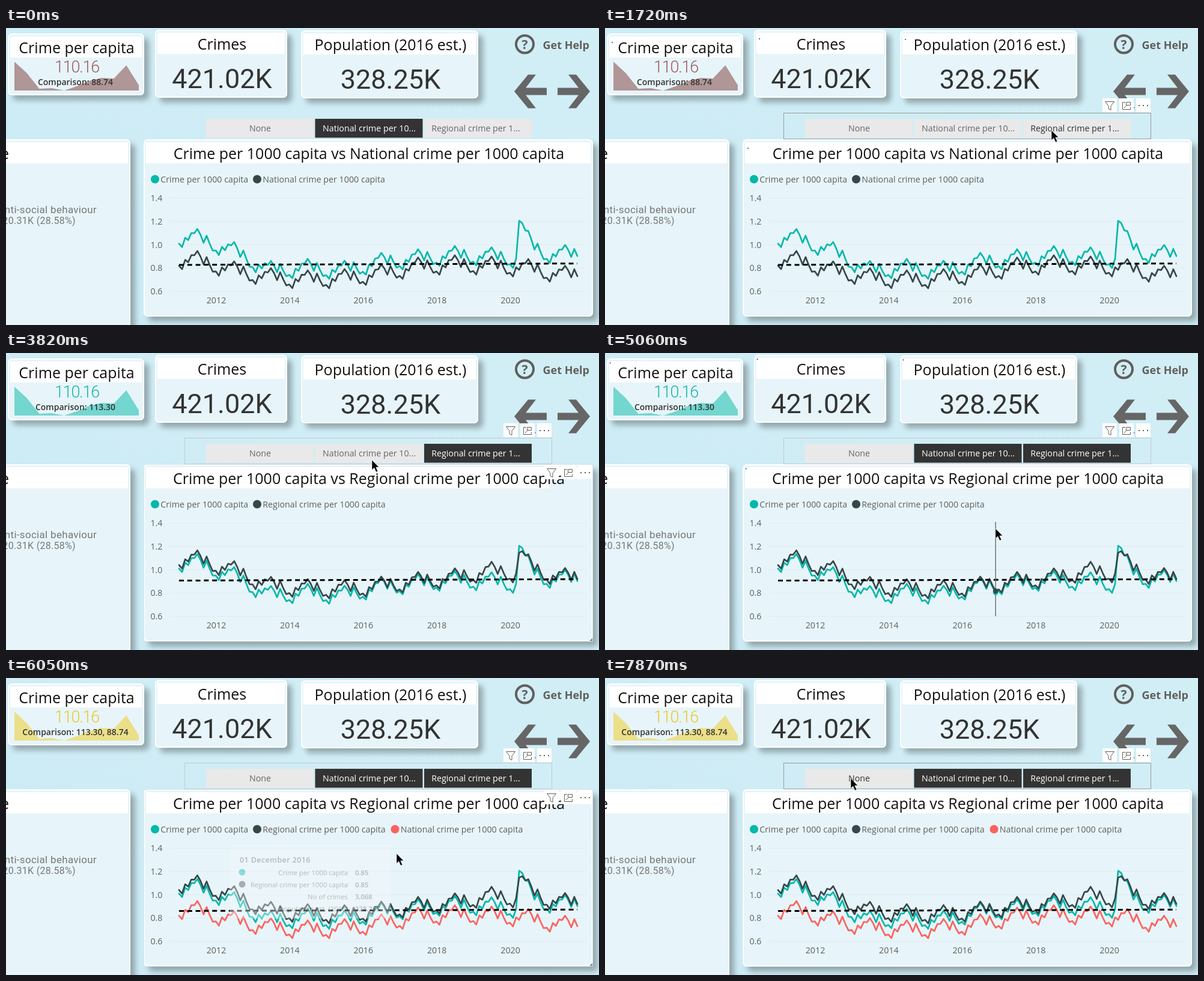
An HTML page for the animation above (8 s loop, 987 by 494 pixels).

```html
<!DOCTYPE html>
<html lang="en">
<head>
<meta charset="utf-8">
<title>Crime dashboard</title>
<style>
  html, body { margin: 0; width: 100%; height: 100%; overflow: hidden; background: #cfecf5; }
  svg { display: block; width: 987px; height: 494px; font: 14.25px "Open Sans", "Noto Sans", sans-serif; fill: #605e5c; }
  .title { font-size: 25px; fill: #111; text-anchor: middle; }
  .mid { text-anchor: middle; }
  .end { text-anchor: end; }
  .din { font-family: Roboto, "Liberation Sans", sans-serif; }
  .big { font-size: 45px; fill: #333; text-anchor: middle; }
  .line { fill: none; stroke-width: 2.7; stroke-linejoin: round; stroke-linecap: round; }
  .icon { fill: none; stroke: #605e5c; stroke-width: 1; }
</style>
</head>
<body>
<svg viewBox="0 0 987 494" xmlns="http://www.w3.org/2000/svg">
  <defs>
    <linearGradient id="bg" x1="0" y1="1" x2="1" y2="0">
      <stop offset="0" stop-color="#cbeaf4"/><stop offset=".6" stop-color="#d0edf6"/><stop offset="1" stop-color="#d2eef5"/>
    </linearGradient>
    <filter id="shadow" x="-10%" y="-15%" width="125%" height="145%">
      <feDropShadow dx="8" dy="8" stdDeviation="5" flood-color="#000" flood-opacity=".29"/>
    </filter>
    <g id="tools">
      <path fill="#fff" d="M828 117h24v23h-24zM856 117h24v23h-24zM884 117h24v23h-24z"/>
      <path class="icon" d="M832.5 122.500h15l-5.500 7v7l-4-2v-5z"/>
      <path class="icon" d="M866 123.500h-4.500v12h13v-4M867.500 123.500h7v5h-7zM864 133l4-4"/>
      <path fill="#605e5c" d="M888 128h2v2h-2zM895 128h2v2h-2zM902 128h2v2h-2z"/>
    </g>
    <path id="arrow" d="M846 105.500L869 77.500H882L865 99.500H900V111.500H865L882 133.500H869Z"/>
  </defs>

  <rect width="987" height="494" fill="url(#bg)"/>
  <g id="cards"></g>

  <path id="spark"/>
  <text id="perCapita" class="din mid" x="118" y="74" font-size="27" font-weight="300" letter-spacing="-1.2">110.16</text>
  <text id="comparison" class="mid" x="115.500" y="95" font-size="14" font-weight="600" fill="#333"></text>
  <text class="title" x="117.500" y="42">Crime per capita</text>
  <text class="title" x="359.500" y="36">Crimes</text>
  <text class="title" x="640" y="37">Population (2016 est.)</text>
  <text class="din big" x="359.500" y="99.500">421.02K</text>
  <text class="din big" x="640" y="100.500">328.25K</text>

  <circle cx="863.500" cy="27" r="14.500" fill="none" stroke="#605e5c" stroke-width="4"/>
  <text class="mid" x="863.500" y="34.500" font-size="21" font-weight="700">?</text>
  <text x="893.500" y="35" font-size="18" font-weight="700">Get Help</text>
  <g fill="#666"><use href="#arrow"/><use href="#arrow" transform="translate(1818) scale(-1 1)"/></g>

  <text class="title" style="text-anchor:end" x="5" y="218">Crime type</text>
  <g class="din end" fill="#777" letter-spacing=".3">
    <text x="151" y="308" font-size="17">Anti-social behaviour</text>
    <text x="116" y="326" font-size="16">120.31K (28.58%)</text>
  </g>

  <g id="buttons"></g>
  <g id="slicerHead"><rect id="slicerEdge" x="297.500" y="141.500" width="611" height="43" fill="none"/><use href="#tools"/></g>

  <rect id="titleCut" x="904" y="209" width="70" height="16" fill="#e7f5fa"/>
  <text id="chartTitle" class="title" x="604" y="218"></text>
  <g id="axes"></g>
  <g id="legend"></g>
  <g id="plot"></g>
  <path id="trend" fill="none" stroke="#000" stroke-width="3" stroke-dasharray="8 5.800"/>
  <g id="cross"></g>
  <g id="chartHead">
    <rect x="229.500" y="185.500" width="747" height="294" fill="none" stroke="#dfe6e8"/>
    <use href="#tools" x="68" y="70"/>
    <path d="M976 474v5h-5z" fill="#888"/>
  </g>
  <g id="spinners" fill="#444"></g>

  <g id="dataTip" font-size="11.300">
    <rect x="372" y="278" width="268" height="122" fill="#f4fafc"/>
    <text x="389" y="307" font-size="12.500" font-weight="600" letter-spacing=".4">01 December 2016</text>
    <circle cx="393" cy="323" r="5.500" fill="#01b8aa"/><circle cx="393" cy="343" r="5.500" fill="#374649"/>
    <g id="tipRows"></g>
  </g>
  <g id="nameTip">
    <rect x="754.500" y="185.500" width="179" height="24" fill="#fff" stroke="#888"/>
    <text x="759" y="202" font-size="11.900">Regional crime per 1000 capita</text>
  </g>
  <path id="cursor" d="M0 0V16.500L3.800 13L7 20L9.800 18.700L6.800 12H11.800Z" fill="#000" stroke="#fff" stroke-width=".6"/>
</svg>
<script>
const $ = id => document.getElementById(id);
const LOOP = 8000, MONTHS = 131, LOCKDOWN = 111;
const TEAL = '#01b8aa', DARK = '#374649', RED = '#fd625e';
const show = (id, on) => $(id).setAttribute('visibility', on ? 'visible' : 'hidden');
const ramp = (t, a, b) => Math.max(0, Math.min(1, (t - a) / (b - a)));
const smooth = p => p * p * (3 - 2 * p);
const mix = (a, b, p) => a + (b - a) * p;

// Monthly rate = yearly level + shared seasonal swing + lockdown surge that decays.
const season = [-5, -8, 0, -2, 4, 4, 8, 4, -2, 5, -1, -6];
function rates(levels, surge) {
  return Array.from({ length: MONTHS }, (_, m) => {
    const year = ramp(m, 5.5, 125.5) * 10, i = Math.min(9, Math.floor(year));
    const bump = m < LOCKDOWN ? 0 : surge * Math.exp((LOCKDOWN - m) / 4);
    return mix(levels[i], levels[i + 1], year - i) + season[m % 12] + bump;
  });
}
const local = { name: 'Crime', data: rates([106, 95, 78, 80, 78, 85, 88, 91, 90, 87, 91], 35) };
const national = { name: 'National crime', data: rates([87, 78, 72, 70, 71, 75, 81, 83, 82, 80, 74], 0) };
const regional = { name: 'Regional crime', data: rates([109, 100, 86, 84, 83, 86, 90, 93, 99, 96, 93], 20) };
const monthX = m => 288 + m * 5.1;
const rateY = v => 438 - (v - 60) * 1.9375;

const modes = [
  { series: [local, national], colors: [TEAL, DARK], trend: 394, compare: '88.74', area: '#b09696', ink: '#a05a5a' },
  { series: [local, regional], colors: [TEAL, DARK], trend: 378.5, compare: '113.30', area: '#73d6cf', ink: '#15b5aa' },
  { series: [local, regional, national], colors: [TEAL, DARK, RED], trend: 387.5, compare: '113.30, 88.74', area: '#ecdf89', ink: '#efc62c' }];

const cards = [[3, 9, 227, 103], [248, 3, 220, 113], [491, 4, 295, 113], [229, 185, 748, 295], [-60, 185, 267, 340]];
$('cards').innerHTML = cards.map(([x, y, w, h]) =>
  `<rect x="${x + 1}" y="${y + 1}" width="${w - 2}" height="${h - 2}" rx="6" fill="#e7f5fa" stroke="#fff" stroke-width="2" filter="url(#shadow)"/>
   <rect x="${x + 4}" y="${y + 5}" width="${w - 8}" height="35" fill="#fff"/>`).join('');

const sparkY = [56, 75, 101, 100, 104, 97, 88, 83, 84, 62, 95];
$('spark').setAttribute('d', 'M14 104' + sparkY.map((y, i) => `L${14 + i * 20.7} ${y}`).join('') + 'V104Z');

$('axes').innerHTML = [60, 80, 100, 120, 140].map(v =>
  `<path d="M273 ${rateY(v)}H965" stroke="#dfe9ec"/><text class="end" x="260.500" y="${rateY(v) + 5}">${(v / 100).toFixed(1)}</text>`).join('') +
  [2012, 2014, 2016, 2018, 2020].map((year, i) => `<text class="mid" x="${350 + i * 122.4}" y="458">${year}</text>`).join('');

const labels = ['None', 'National crime per 10...', 'Regional crime per 1...'];
const buttonX = i => 333 + i * 181.5;
$('buttons').innerHTML = labels.map((s, i) =>
  `<rect x="${buttonX(i)}" y="151" width="179" height="31.500"/><text class="mid" x="${buttonX(i) + (i == 2 ? 86 : 90)}" y="172">${s}</text>`).join('');
const boxes = [...$('buttons').querySelectorAll('rect')];
const captions = [...$('buttons').querySelectorAll('text')];

$('tipRows').innerHTML = [['Crime per 1000 capita', '0.85'], ['Regional crime per 1000 capita', '0.85'],
  ['No of crimes', '3,068'], ['Population est. (2016)', '328.25K']].map(([k, v], i) =>
  `<text class="end" x="569" y="${327.5 + i * 20}">${k}</text><text x="581" y="${327.5 + i * 20}" font-weight="600">${v}</text>`).join('');

let mode;
function drawMode(next) {
  if (next === mode) return;
  mode = next;
  const { series, colors, trend, compare, area, ink } = mode;
  $('chartTitle').textContent = `Crime per 1000 capita vs ${series[1].name} per 1000 capita`;
  $('comparison').textContent = 'Comparison: ' + compare;
  $('spark').setAttribute('fill', area);
  $('perCapita').setAttribute('fill', ink);
  $('trend').setAttribute('d', `M288 ${trend}L951 ${trend - 2.3}`);
  const legendX = [248, 418, 647.5];
  $('legend').innerHTML = series.map(({ name }, i) =>
    `<circle cx="${legendX[i]}" cy="251.500" r="7" fill="${colors[i]}"/><text x="${legendX[i] + 9.3}" y="257">${name} per 1000 capita</text>`).join('');
  $('plot').innerHTML = series.map(({ data }, i) =>
    `<polyline class="line" stroke="${colors[i]}" points="${data.map((v, m) => monthX(m) + ',' + rateY(v)).join(' ')}"/>`).join('');
}

// Pointer stops: time, x, y. It eases between them in 90 ms steps.
const stops = [
  [180, 610, 474], [900, 743, 170], [1720, 743, 170], [1900, 722, 288], [2720, 715, 299], [3280, 715, 295],
  [3820, 609, 178], [4180, 612, 162], [4460, 612, 162], [5060, 650, 292], [6230, 650, 292], [7130, 410, 172], [7870, 409, 167]];
function pointer(t) {
  const i = stops.filter(s => s[0] <= t).length - 1;
  if (i < 0) return [-99, -99];
  const [t0, x0, y0] = stops[i], [t1, x1, y1] = stops[i + 1] || [LOOP, x0, y0];
  const p = smooth(Math.floor((t - t0) / 90) * 90 / (t1 - t0));
  return [mix(x0, x1, p), mix(y0, y1, p)];
}

function drawCross(x, on) {
  show('cross', on);
  if (!on) return;
  const m = Math.round((x - 288) / 5.1), cx = monthX(m);
  $('cross').innerHTML = `<path d="M${cx} 281V438" stroke="#666" stroke-width="1.400"/>` +
    mode.series.map(({ data }, i) => `<circle cx="${cx}" cy="${rateY(data[m])}" r="4.300" fill="${mode.colors[i]}"/>`).join('');
}

function drawSpinners(t, on) {
  show('spinners', on);
  if (!on) return;
  const a = (100 / 360 + (t - 1720) / 1010) * 2 * Math.PI;
  $('spinners').innerHTML = cards.slice(0, 4).map(([x, y]) =>
    `<circle cx="${x + 10 + 5 * Math.cos(a)}" cy="${y + 10 + 5 * Math.sin(a)}" r="1"/>`).join('');
}

function render(t) {
  drawMode(modes[t < 2270 ? 0 : t < 5870 ? 1 : 2]);
  const [x, y] = pointer(t);
  $('cursor').setAttribute('transform', `translate(${x} ${y})`);
  const redrawn = t >= 5870 && t < 6320;
  drawCross(x, y > 281 && y < 438 && !redrawn);
  drawSpinners(t, (t >= 1720 && t < 2270) || (t >= 4640 && t < 5870));

  const overSlicer = y > 141 && y < 177;
  const overChart = y >= 177 && !(t >= 4460 && t < 5150);
  show('slicerHead', t >= 810);
  $('slicerEdge').setAttribute('stroke', overSlicer ? '#999' : '#c3cacd');
  show('chartHead', overChart);
  show('titleCut', overChart);

  const selected = [false, t < 1720 || t >= 4550, t >= 1810];
  boxes.forEach((box, i) => {
    const hover = overSlicer && x > buttonX(i) && x < buttonX(i) + 179;
    box.setAttribute('fill', selected[i] ? '#333' : '#e9e9e9');
    captions[i].setAttribute('fill', selected[i] ? '#fff' : hover ? '#333' : '#666');
  });

  show('nameTip', t >= 1170 && t < 1350);
  $('dataTip').setAttribute('opacity', .95 * ramp(t, 5380, 5600) * (1 - ramp(t, 5940, 6130)));
}

const start = performance.now();
function tick() {
  render((performance.now() - start) % LOOP);
  requestAnimationFrame(tick);
}
render(0);
tick();
</script>
</body>
</html>
```
